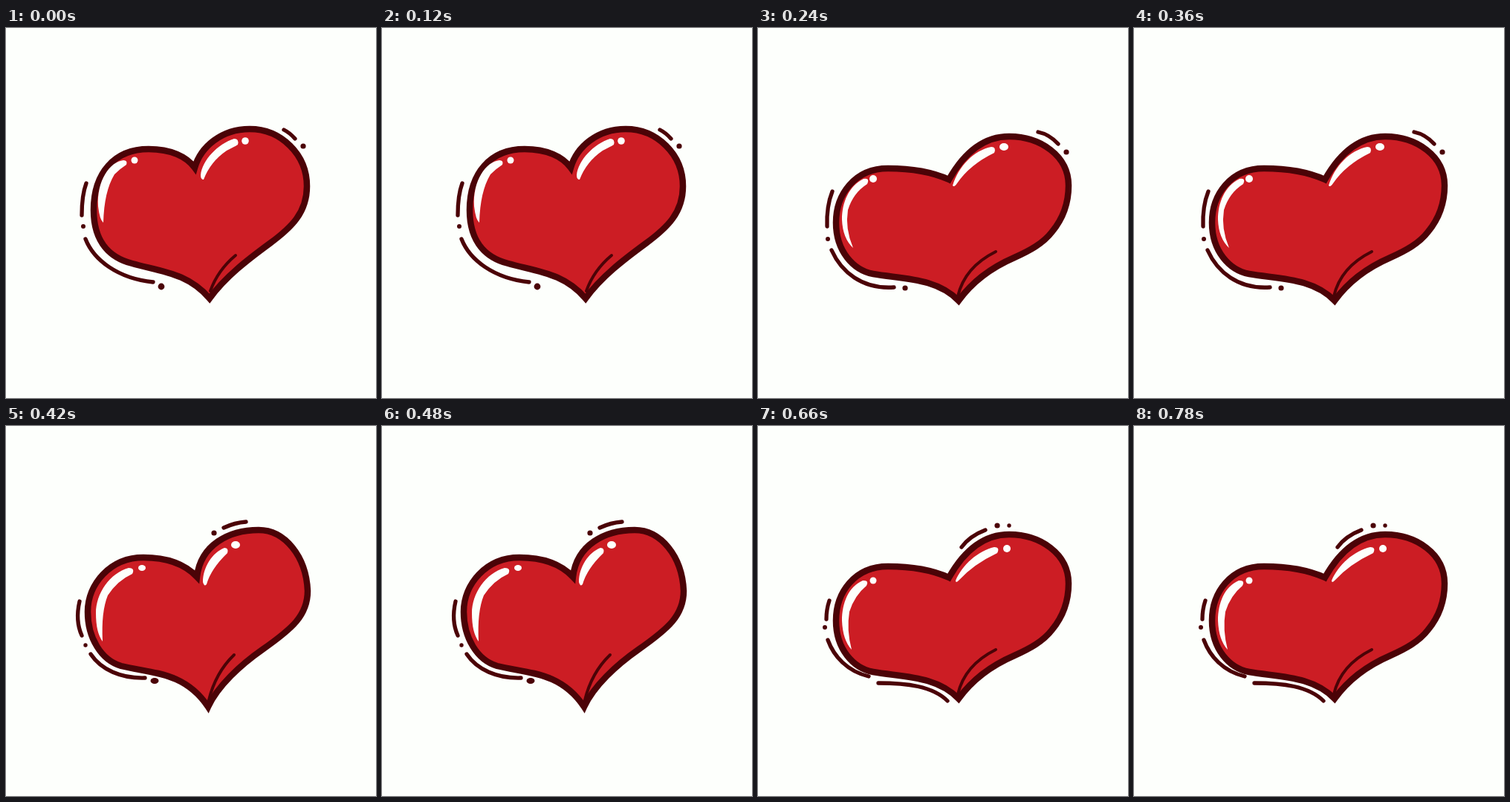
Write an HTML page that moves like this. It is 498 by 498 pixels and loops after 0.84 s.

```html
<!DOCTYPE html>
<html lang="en">
<head>
<meta charset="utf-8">
<title>Beating heart</title>
<style>
  html, body { margin: 0; width: 100%; height: 100%; overflow: hidden; background: #fdfffc; }
  svg { display: block; width: 498px; height: 498px; }
  .pose { display: none; }
  .heart { fill: #cc1d24; stroke: #4b0307; stroke-width: 8.5; stroke-linejoin: miter; }
  .line { fill: none; stroke: #4b0307; stroke-width: 5.3; stroke-linecap: round; }
  .crease { fill: none; stroke: #4b0307; stroke-width: 4; stroke-linecap: round; }
  .dot { fill: #4b0307; }
  .shine { fill: #fdfffc; }
</style>
</head>
<body>
<svg viewBox="0 0 498 498">
  <defs>
    <g id="wide">
      <path class="heart" d="M257 204C235 194 205 189 175 189C130 189 105 224 105 262C105 300 128 326 155 331C195 338 240 336 270 367C288 342 315 322 345 309C365 300 384 290 396 274C410 257 418 236 418 212C418 172 380 146 338 146C300 146 275 172 257 204Z"/>
      <path class="crease" d="M269 361Q278 322 320 301"/>
    </g>
  </defs>

  <g class="pose">
    <path class="heart" d="M254 188C243 173 222 163 192 163C146 163 118 195 118 245C118 290 142 310 170 317C210 328 245 330 274 364C295 335 325 312 355 290C385 268 405 248 405 213C405 170 370 136 328 136C290 136 262 160 254 188Z"/>
    <path class="crease" d="M275 354Q285 326 309 306"/>
    <path class="shine" d="M158 178C140 180 122 205 124 240Q126 258 131 262Q132 220 146 197Q154 189 162 184Q164 178 158 178ZM307 149C285 156 264 178 262 198Q262 204 266 204Q275 180 297 165Q307 160 312 157Q314 149 307 149Z"/>
    <circle class="shine" cx="173" cy="178" r="4.5"/>
    <circle class="shine" cx="322" cy="152" r="4.8"/>
    <path class="line" d="M374 137Q382 141 389 149M108 209Q102 225 102 252M107 284C118 312 150 337 198 342"/>
    <circle class="dot" cx="400" cy="159" r="3.6"/>
    <circle class="dot" cx="104" cy="267" r="3"/>
    <circle class="dot" cx="209" cy="348" r="4.4"/>
  </g>

  <g class="pose">
    <use href="#wide"/>
    <path class="shine" d="M142 203C122 213 113 235 113 258Q114 283 128 296Q117 270 121 245Q128 222 147 210Q151 201 142 203ZM314 160C290 165 270 186 262 212Q264 215 268 209Q285 184 318 168Q321 160 314 160Z"/>
    <circle class="shine" cx="155" cy="203" r="5"/>
    <ellipse class="shine" cx="331" cy="160" rx="6" ry="5"/>
    <path class="line" d="M377 140Q392 143 404 156M100 220Q92 240 93 267M99 299C112 328 140 352 183 349"/>
    <circle class="dot" cx="415" cy="167" r="3.6"/>
    <circle class="dot" cx="94" cy="284" r="3"/>
    <circle class="dot" cx="198" cy="350" r="3.6"/>
  </g>

  <g class="pose">
    <path class="heart" d="M257 203C240 185 215 177 185 177C140 177 110 213 110 250C110 285 128 315 155 323C195 333 240 330 272 378C285 350 315 322 345 301C385 273 406 255 406 222C404 175 375 140 340 140C300 140 262 160 257 203Z"/>
    <path class="crease" d="M273 369Q282 332 307 308"/>
    <path class="shine" d="M165 191C140 198 121 225 121 252Q121 278 130 290Q128 250 137 228Q150 208 170 199Q174 191 165 191ZM294 164C278 170 265 190 265 210Q267 217 270 213Q276 192 298 171Q300 164 294 164Z"/>
    <ellipse class="shine" cx="183" cy="191" rx="5" ry="4"/>
    <ellipse class="shine" cx="309" cy="160" rx="6" ry="5"/>
    <path class="line" d="M293 137Q308 130 323 129M99 236Q93 262 102 282M114 307C128 328 155 340 187 339"/>
    <circle class="dot" cx="280" cy="144" r="3.6"/>
    <circle class="dot" cx="107" cy="295" r="2.7"/>
    <ellipse class="dot" cx="200" cy="343" rx="5.5" ry="4"/>
  </g>

  <g class="pose">
    <use href="#wide"/>
    <path class="shine" d="M141 208C122 216 113 238 113 262Q114 288 126 301Q119 274 123 250Q130 228 146 215Q150 207 141 208ZM318 163C296 168 275 187 266 208Q266 212 270 208Q290 186 322 171Q326 163 318 163Z"/>
    <circle class="shine" cx="155" cy="208" r="4.5"/>
    <circle class="shine" cx="335" cy="165" r="5"/>
    <path class="line" d="M274 163Q285 148 306 140M96 235Q92 247 92 260M94 288C102 310 120 330 149 337M162 346C200 346 235 350 255 370"/>
    <circle class="dot" cx="322" cy="134" r="3.6"/>
    <circle class="dot" cx="338" cy="134" r="2.7"/>
    <circle class="dot" cx="90" cy="271" r="3"/>
  </g>
</svg>
<script>
  const LOOP = 840;
  const starts = [0, 180, 420, 660];
  const poses = document.querySelectorAll('.pose');

  function draw() {
    const t = performance.now() % LOOP;
    const current = starts.findLastIndex(start => t >= start);
    poses.forEach((pose, i) => pose.style.display = i === current ? 'inline' : 'none');
    requestAnimationFrame(draw);
  }
  draw();
</script>
</body>
</html>
```
